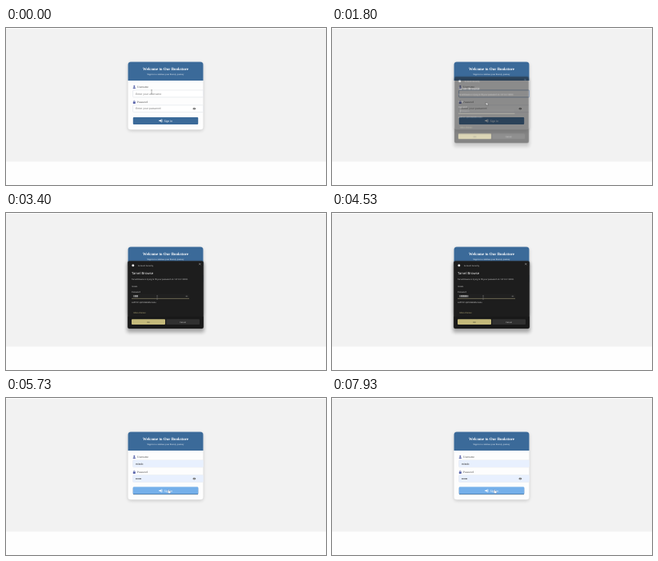
Animation, 400 px wide and 197 px high, one loop 8 s. Source, as an HTML page:

```html
<!DOCTYPE html>
<html lang="en">
<head>
<meta charset="utf-8">
<title>Bookstore sign in</title>
<style>
  html, body { margin: 0; width: 100%; height: 100%; overflow: hidden; background: #fefefe; }
  svg { display: block; width: 100vw; height: 100vh; }
  text { text-rendering: geometricPrecision; }
  .serif { font-family: "Liberation Serif", serif; }
  .sans { font-family: "Liberation Sans", sans-serif; font-size: 3.45px; }
  .ui { font-family: "Open Sans", sans-serif; font-size: 2.45px; fill: #e4e4e4; }
  .mid { text-anchor: middle; }
  .hint { fill: #777; }
  .box { fill: #fff; stroke: #d9dde2; stroke-width: .5; }

  /* Percentages are milliseconds / 80. */
  .t { animation: 8s step-end infinite; }
  .focus { animation-name: focus; }
  .menu { animation-name: menu; }
  .preview { animation-name: preview; }
  .blank { animation-name: blank; }
  .dialog { animation-name: dialog; animation-timing-function: linear; transform-origin: 199.5px 102px; }
  .filled { animation-name: filled; }
  .caret { animation-name: caret; }
  .ghost { animation-name: ghost; }
  .empty { animation-name: empty; }
  .typed { animation-name: typed; }
  .reveal { animation-name: reveal; }
  .hot { animation-name: hot; animation-timing-function: linear; }
  .pointer { animation-name: move; animation-timing-function: ease-in-out; }
  .beam { animation-name: beam; }
  .arrow { animation-name: arrow; }
  .hand { animation-name: hand; }

  @keyframes focus { 0% { opacity: 0 } 3.375% { opacity: 1 } 58.75%, 100% { opacity: 0 } }
  @keyframes menu { 0% { opacity: 0 } 4.125% { opacity: 1 } 21.625%, 100% { opacity: 0 } }
  @keyframes preview { 0% { opacity: 0 } 11.7% { opacity: 1 } 21.625%, 100% { opacity: 0 } }
  @keyframes blank { 0% { opacity: 1 } 11.7%, 100% { opacity: 0 } }
  @keyframes dialog {
    0%, 21.6% { opacity: 0; transform: scale(.96) }
    23.4%, 58.7% { opacity: 1; transform: none }
    58.75%, 100% { opacity: 0; transform: none }
  }
  @keyframes filled { 0% { opacity: 0 } 58.75%, 100% { opacity: 1 } }
  @keyframes caret { 0% { opacity: 0 } 58.75% { opacity: 1 } 66%, 100% { opacity: 0 } }
  @keyframes ghost { 0% { opacity: 0 } 58.75% { opacity: 1 } 63.5%, 100% { opacity: 0 } }
  @keyframes empty { 0% { opacity: 1 } 35%, 100% { opacity: 0 } }
  @keyframes typed {
    0%, 33.5% { width: 0; animation-timing-function: steps(7) }
    53%, 100% { width: 11.55px }
  }
  @keyframes reveal { 0% { opacity: 0 } 35%, 100% { opacity: 1 } }
  @keyframes hot { 0%, 67% { opacity: 0 } 70%, 100% { opacity: 1 } }
  @keyframes move {
    0%, 10.8% { transform: translate(182px, 80px) }
    10.875% { transform: translate(190.5px, 91.5px) }
    14.1%, 21.6% { transform: translate(192.5px, 93px) }
    28.4% { transform: translate(192.8px, 94.5px) }
    31.6%, 65% { transform: translate(189px, 106px) }
    70%, 100% { transform: translate(203px, 115px) }
  }
  @keyframes beam { 0% { opacity: 1 } 10.875% { opacity: 0 } 31% { opacity: 1 } 58.75%, 100% { opacity: 0 } }
  @keyframes arrow { 0% { opacity: 0 } 10.875% { opacity: 1 } 31% { opacity: 0 } 58.75% { opacity: 1 } 68%, 100% { opacity: 0 } }
  @keyframes hand { 0% { opacity: 0 } 68%, 100% { opacity: 1 } }
</style>
</head>
<body>
<svg viewBox="0 0 400 197" preserveAspectRatio="none">
  <defs>
    <filter id="soft" x="-20%" y="-20%" width="140%" height="140%"><feGaussianBlur stdDeviation="2"/></filter>
    <clipPath id="typing"><rect class="t typed" x="159.4" y="102" width="0" height="5"/></clipPath>
    <g id="eye">
      <path d="M-2 0Q0-2.6 2 0Q0 2.6-2 0Z" fill="#555"/>
      <circle r=".75" fill="#ddd"/>
      <circle r=".35" fill="#444"/>
    </g>
    <g id="dots" fill="currentColor">
      <circle cx=".6" r=".55"/><circle cx="1.8" r=".55"/><circle cx="3" r=".55"/><circle cx="4.2" r=".55"/>
      <circle cx="5.4" r=".55"/><circle cx="6.6" r=".55"/>
    </g>
    <g id="enter" fill="#fff">
      <path d="M-2-.6h1.8v-1.1L1.5 0-.2 1.7V.6H-2Z"/>
      <path d="M.7-1.6h1.2v3.2H.7" fill="none" stroke="#fff" stroke-width=".5"/>
    </g>
  </defs>

  <rect width="400" height="197" fill="#fefefe"/>
  <rect y="1" width="400" height="166.5" fill="#f2f2f2"/>

  <g class="t ghost">
    <path d="M153 128V141q0 3 3 3h87q3 0 3-3V128Z" fill="#ededed"/>
    <path d="M155 128v12q0 2 2 2h85q2 0 2-2v-12Z" fill="#f4f4f4" stroke="#e3e3e3" stroke-width=".5"/>
  </g>

  <!-- Sign-in card -->
  <rect x="152.5" y="44" width="94" height="85" rx="4" fill="#000" opacity=".17" filter="url(#soft)"/>
  <rect x="152.5" y="42.5" width="94" height="85" rx="3.5" fill="#fdfdfd"/>
  <path d="M152.5 66V46q0-3.5 3.5-3.5h87q3.5 0 3.5 3.5v20Z" fill="#3b6a99"/>
  <g class="serif mid" fill="#fff">
    <text x="199.5" y="53.2" font-size="4.95" font-weight="700">Welcome to Our Bookstore</text>
    <text x="199.5" y="59" font-size="2.85">Sign in to continue your literary journey</text>
  </g>
  <g fill="#5560a8">
    <circle cx="160.3" cy="73" r="1"/>
    <path d="M158.6 76q0-1.8 1.7-1.8t1.7 1.8Z"/>
    <rect x="158.8" y="92.6" width="3" height="2.4" rx=".4"/>
    <path d="M159.4 92.8v-.7a.9.9 0 0 1 1.8 0v.7" fill="none" stroke="#5560a8" stroke-width=".5"/>
  </g>
  <g class="serif" font-size="3.45" fill="#444">
    <text x="164" y="75.3">Username</text>
    <text x="164" y="94.3">Password</text>
  </g>

  <rect class="box" x="158.6" y="78" width="88" height="8.8" rx="1"/>
  <rect class="box" x="158.6" y="96.8" width="88" height="8.8" rx="1"/>
  <rect class="t focus" x="158.6" y="78" width="88" height="8.8" rx="1" fill="#fff" stroke="#7d9cc4" stroke-width=".7"/>
  <text class="sans hint t blank" x="162" y="83.5">Enter your username</text>
  <text class="sans t preview" x="162" y="83.5" fill="#333">mirelo</text>
  <text class="sans hint" x="162" y="102.3">Enter your password</text>
  <g class="t filled">
    <rect x="158.6" y="78" width="88" height="8.8" rx="1" fill="#e8f0fe"/>
    <rect x="158.6" y="96.8" width="88" height="8.8" rx="1" fill="#e8f0fe"/>
    <text class="sans" x="162" y="83.5" fill="#222">mirelo</text>
    <use href="#dots" x="162" y="101.2" color="#222"/>
  </g>
  <rect class="t caret" x="171.3" y="80.3" width=".4" height="4" fill="#222"/>
  <use href="#eye" x="235.3" y="101.2"/>

  <rect x="158.8" y="112" width="81.4" height="9" rx="1" fill="#3b6a99"/>
  <g class="t hot">
    <rect x="158.8" y="113" width="81.4" height="9" rx="1" fill="#000" opacity=".1"/>
    <rect x="158.8" y="111.5" width="81.4" height="9" rx="1" fill="#75b0ea"/>
  </g>
  <use href="#enter" x="193.2" y="116.4"/>
  <text class="sans" x="197.4" y="117.7" fill="#fff">Sign In</text>

  <!-- Saved password menu -->
  <g class="t menu">
    <rect x="179.5" y="89" width="44" height="23" rx="2" fill="#000" opacity=".2" filter="url(#soft)"/>
    <path d="M182 89l2-2 2 2Z" fill="#202327"/>
    <rect x="179.5" y="88.5" width="43.5" height="22.7" rx="1.6" fill="#202327"/>
    <rect class="t preview" x="179.5" y="89.5" width="43.5" height="11" fill="#34373b"/>
    <path d="M179.5 101h43.5" stroke="#3b3e42" stroke-width=".3"/>
    <circle cx="184" cy="95" r="1.5" fill="#9b9b91"/>
    <circle cx="184" cy="106" r="1.5" fill="#8d9197"/>
    <text class="ui" x="188.8" y="94.4" font-weight="600">mirelo</text>
    <use href="#dots" x="0" y="0" color="#8d9197" transform="translate(188.8 97.6) scale(.8)"/>
    <text class="ui" x="188.8" y="107">Manage passwords…</text>
    <text class="ui" x="216.5" y="107" style="fill:#aaa">Pw</text>
  </g>

  <!-- System prompt -->
  <g class="t dialog">
    <rect x="151" y="62" width="97" height="88" rx="3" fill="#000" opacity=".3" filter="url(#soft)"/>
    <rect x="152.2" y="60.2" width="94.6" height="84.8" rx="2" fill="#1d1d1d" stroke="#3a3a3a" stroke-width=".4"/>
    <path d="M152.4 130h94.2v13q0 1.8-1.8 1.8h-90.6q-1.8 0-1.8-1.8Z" fill="#191919"/>
    <circle cx="158.8" cy="65.8" r="1.5" fill="#e4e4e4"/>
    <path d="M241.2 63l2.2 2.2m0-2.2l-2.2 2.2" stroke="#ddd" stroke-width=".4"/>
    <text class="ui" x="165" y="66.8">Account Security</text>
    <text class="ui" x="157" y="76.5" style="font-size:4.2px;fill:#fff">Tarvel Browse</text>
    <text class="ui" x="157" y="83.6">Tarvel Browse is trying to fill your password on 127.0.0.1:8000.</text>
    <text class="ui" x="157" y="93">mirelo</text>
    <text class="ui" x="157" y="100.2">Password</text>
    <rect x="157" y="101.4" width="72" height="6" rx=".6" fill="#202020"/>
    <path d="M157 107.4h72" stroke="#b5ad83" stroke-width=".5"/>
    <g class="t empty">
      <text class="ui" x="160" y="105.4" style="fill:#8b8b8b">Password</text>
      <path d="M159.4 102.6v3.6" stroke="#ddd" stroke-width=".35"/>
    </g>
    <g clip-path="url(#typing)" color="#eee">
      <g transform="translate(159.4 104.4) scale(1.35 1)">
        <use href="#dots"/><use href="#dots" x="1.2"/>
      </g>
    </g>
    <g class="t reveal"><use href="#eye" transform="translate(225.8 104.4) scale(.65)" opacity=".9"/></g>
    <text class="ui" x="157" y="113">LAPTOP-Q47HNR2B\mirelo</text>
    <text class="ui" x="159.6" y="125.7" style="fill:#d1c78d">More choices</text>
    <rect x="157" y="133.2" width="42" height="6.8" rx=".9" fill="#c5ba7b"/>
    <rect x="200.2" y="133.2" width="41.8" height="6.8" rx=".9" fill="#303030"/>
    <text class="ui mid" x="178" y="137.5" style="fill:#222">OK</text>
    <text class="ui mid" x="221" y="137.5">Cancel</text>
  </g>

  <g class="t pointer">
    <path class="t beam" d="M-.9-2.2h1.8M0-2.2v4.4M-.9 2.2h1.8" fill="none" stroke="#777" stroke-width=".5"/>
    <path class="t arrow" d="M0 0v4l1-.8.6 1.5.7-.3-.6-1.5h1.3Z" fill="#fff" stroke="#333" stroke-width=".35"/>
    <path class="t hand" d="M0 0q.6-.5.9.2v1.5l1.5.4q.5.2.4.8l-.4 1.7H.2L-1 2.8q0-.8 1-.2Z" fill="#fff" stroke="#667" stroke-width=".25"/>
  </g>
</svg>
</body>
</html>
```
